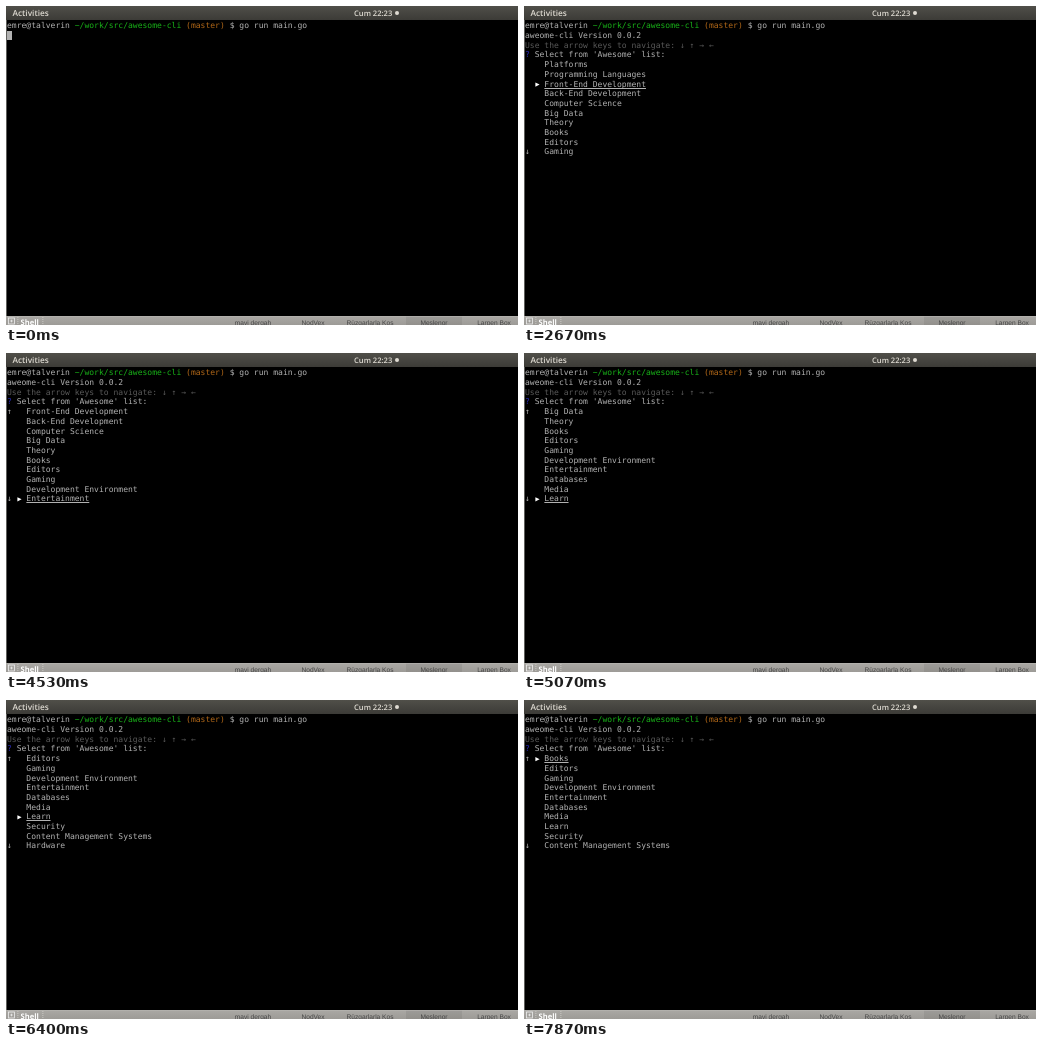
Write an HTML page with a canvas that moves like this. It is 512 by 319 pixels and loops after 8000 ms.

```html
<!DOCTYPE html>
<html lang="en">
<head>
<meta charset="utf-8">
<title>Terminal list prompt</title>
<style>
  html, body { margin: 0; width: 100%; height: 100%; overflow: hidden; background: #000; }
  canvas { display: block; width: 100vw; height: 100vh; }
</style>
</head>
<body>
<canvas id="stage"></canvas>
<script>
const W = 512, H = 319, LOOP = 8000;
const COL = 4.84, ROW = 9.69, LEFT = 1, BASE = 22.4;
const LIST_ROW = 4, VISIBLE = 10, LIST_START = 1330;
const MONO = '8.04px "DejaVu Sans Mono", monospace';
const GRAY = '#b2b2b2', DIM = '#595959', GREEN = '#18b218', BROWN = '#b26818', BLUE = '#2828b2';

const items = [
  'Platforms', 'Programming Languages', 'Front-End Development', 'Back-End Development',
  'Computer Science', 'Big Data', 'Theory', 'Books', 'Editors', 'Gaming',
  'Development Environment', 'Entertainment', 'Databases', 'Media', 'Learn',
  'Security', 'Content Management Systems', 'Hardware'
];

// Key press times in ms
const downs = [2000, 2670, 2930, 3070, 3270, 3400, 3600, 3870, 4070, 4270,
  4470, 4670, 4870, 5070, 5270, 5530, 5670];
const ups = [6070, 6270, 6400, 6670, 6870, 7000, 7200, 7400, 7530, 7730];

const canvas = document.getElementById('stage');
const ctx = canvas.getContext('2d');

function fit() {
  const dpr = window.devicePixelRatio || 1;
  canvas.width = Math.round(W * dpr);
  canvas.height = Math.round(H * dpr);
  ctx.setTransform(canvas.width / W, 0, 0, canvas.height / H, 0, 0);
  ctx.textRendering = 'geometricPrecision';
}

const baseline = row => BASE + row * ROW;

function rect(x, y, w, h, fill) {
  ctx.fillStyle = fill;
  ctx.fillRect(x, y, w, h);
}

function label(text, x, y, font, color, align = 'left') {
  ctx.font = font;
  ctx.fillStyle = color;
  ctx.textAlign = align;
  ctx.fillText(text, x, y);
}

// Writes text on the terminal's character grid
function put(text, col, row, color = GRAY) {
  ctx.font = MONO;
  ctx.fillStyle = color;
  ctx.textAlign = 'left';
  [...text].forEach((ch, i) => {
    if (ch !== ' ') ctx.fillText(ch, LEFT + (col + i) * COL, baseline(row));
  });
}

function putRuns(row, runs) {
  let col = 0;
  for (const [text, color] of runs) {
    put(text, col, row, color);
    col += text.length;
  }
}

function topBar() {
  const shade = ctx.createLinearGradient(0, 0, 0, 14);
  shade.addColorStop(0, '#504f49');
  shade.addColorStop(1, '#3c3b37');
  rect(0, 0, W, 14, shade);
  label('Activities', 6.5, 10, '600 8.3px "Open Sans", sans-serif', '#dfdbd2');
  label('Cum 22:23', 348, 9.8, '600 7.6px "Open Sans", sans-serif', '#dfdbd2');
  ctx.beginPath();
  ctx.arc(391, 7, 2, 0, Math.PI * 2);
  ctx.fill();
}

function bottomBar() {
  const shade = ctx.createLinearGradient(0, 310, 0, H);
  shade.addColorStop(0, '#aaa8a4');
  shade.addColorStop(1, '#9d9b97');
  rect(0, 310, W, 9, shade);
  rect(400, 310, 56, 9, 'rgba(0,0,0,0.07)');
  rect(0, 310, W, 0.6, '#b8b6b2');

  ctx.strokeStyle = '#eeeeee';
  ctx.lineWidth = 0.8;
  ctx.strokeRect(2.5, 312, 6, 6);
  rect(4.2, 314.6, 2.6, 0.8, '#eeeeee');
  rect(5.1, 313.7, 0.8, 2.6, '#eeeeee');
  for (const x of [11.5, 36.5])
    for (let y = 311; y < H; y += 2) rect(x, y, 0.8, 1, '#d4d2ce');
  label('Shell', 14.5, 318.6, 'bold 7.6px "Open Sans", sans-serif', '#ffffff');

  const tabs = [['mavi dergah', 247], ['NodVex', 307], ['Rüzgarlarla Koş', 364],
    ['Meslenor', 428], ['Larpen Box', 488]];
  for (const [name, x] of tabs)
    label(name, x, 319.3, '6.6px "Liberation Sans", sans-serif', '#444444', 'center');
}

function selection(t) {
  let index = 0, top = 0;
  for (const at of downs) if (t >= at) {
    index++;
    top = Math.max(top, index - VISIBLE + 1);
  }
  for (const at of ups) if (t >= at) {
    index--;
    top = Math.min(top, index);
  }
  return { index, top };
}

function marker(row) {
  const y = baseline(row) - 2;
  ctx.fillStyle = '#ffffff';
  ctx.beginPath();
  ctx.moveTo(11.4, y - 2.1);
  ctx.lineTo(15.6, y);
  ctx.lineTo(11.4, y + 2.1);
  ctx.fill();
}

function menu(t) {
  const { index, top } = selection(t);
  put('aweome-cli Version 0.0.2', 0, 1);
  put('Use the arrow keys to navigate: ↓ ↑ → ←', 0, 2, DIM);
  put('?', 0, 3, BLUE);
  put("Select from 'Awesome' list:", 2, 3);

  items.slice(top, top + VISIBLE).forEach((name, i) => {
    const row = LIST_ROW + i;
    put(name, 4, row);
    if (top + i === index) {
      marker(row);
      rect(LEFT + 4 * COL, Math.round(baseline(row) + 1), name.length * COL, 1, GRAY);
    }
  });
  if (top > 0) put('↑', 0, LIST_ROW);
  put('↓', 0, LIST_ROW + VISIBLE - 1);
}

function draw(t) {
  rect(0, 0, W, H, '#000000');
  rect(0, 14, 0.8, 296, '#777773');
  topBar();
  putRuns(0, [
    ['emre@talverin ', GRAY],
    ['~/work/src/awesome-cli ', GREEN],
    ['(master) ', BROWN],
    ['$ go run main.go', GRAY]
  ]);
  if (t < LIST_START) rect(1, 25, 5, 9, GRAY);
  else menu(t);
  bottomBar();
}

const start = performance.now();
function tick() {
  draw((performance.now() - start) % LOOP);
  requestAnimationFrame(tick);
}

window.addEventListener('resize', fit);
fit();
tick();
</script>
</body>
</html>
```
